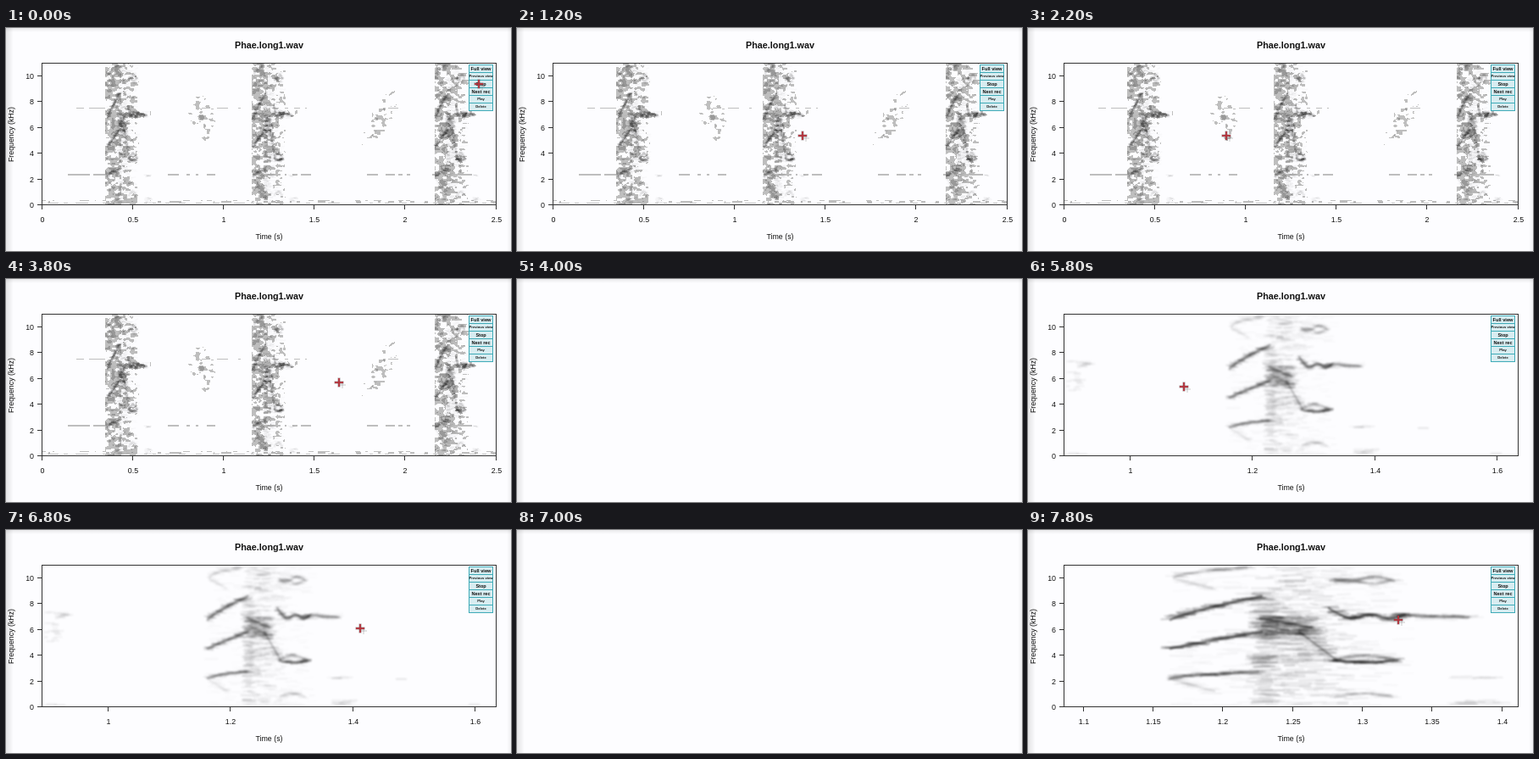
Write an HTML page with a canvas that moves like this. It is 596 px wide and 263 px high and loops after 8 s.

```html
<!DOCTYPE html>
<html lang="en">
<head>
<meta charset="utf-8">
<title>Spectrogram zoom</title>
<style>
html, body { margin: 0; width: 100%; height: 100%; overflow: hidden; background: #fdfdff; }
canvas { display: block; }
</style>
</head>
<body>
<canvas id="stage" width="596" height="263"></canvas>
<script>
const W = 596, H = 263, LOOP = 8000, STEP = 200;
const LEFT = 43, RIGHT = 578, TOP = 42, BOTTOM = 209, KHZ = 15.2;
const FONT = '"Liberation Sans", Arial, sans-serif';
const { sin, cos, exp, sqrt, abs, floor, max, hypot, round, PI } = Math;

// Call shapes are laid out in the closest view; k and dx map them to each view.
const views = [
  { k: .13, dx: 270.1, blur: .45, x0: 43, scale: 214.2, first: 0, gap: .5, count: 6, shifts: [-172, 0, 215] },
  { k: .4384, dx: 164.5, blur: .8, x0: -601, scale: 722, first: 1, gap: .2, count: 4, shifts: [0] },
  { k: 1, dx: 0, blur: 1, x0: -1746.2, scale: 1647, first: 1.1, gap: .05, count: 7, shifts: [0] }
];

const buttons = [['Full view', 5.7], ['Previous view', 4.2], ['Stop', 5.5],
  ['Next rec', 5.6], ['Play', 4.1], ['Delete', 4.2]];

// [step, x, y]
const cursorPath = [[0, 558, 66], [6, 337, 127], [11, 234, 127], [13, 234, 127], [19, 393, 122],
  [23, 393, 122], [24, 366, 128], [28, 168, 127], [29, 184, 127], [30, 184, 127],
  [34, 418, 116], [38, 418, 116], [39, 437, 106]];

let seed = 7;
const random = () => (seed = (seed * 1664525 + 1013904223) % 4294967296) / 4294967296;
const between = (a, b) => a + (b - a) * random();
const lerp = (a, b, u) => a + (b - a) * u;

function newLayer() {
  const canvas = document.createElement('canvas');
  canvas.width = W;
  canvas.height = H;
  return canvas.getContext('2d');
}

function hash(i, j) {
  const s = sin(i * 127.1 + j * 311.7) * 43758.5453;
  return s - floor(s);
}

function noise(x, y) {
  const i = floor(x), j = floor(y);
  const ease = u => u * u * (3 - 2 * u), u = ease(x - i), v = ease(y - j);
  return lerp(lerp(hash(i, j), hash(i + 1, j), u), lerp(hash(i, j + 1), hash(i + 1, j + 1), u), v);
}

function drawCall(g, { k, dx }, shift) {
  const px = x => x * k + dx + shift, fade = sqrt(k);
  g.lineCap = g.lineJoin = 'round';

  function smear(x, y, length, alpha) {
    const half = length * k / 2 + .5, tilt = between(-.8, .8);
    g.strokeStyle = `rgba(0,0,0,${alpha * fade})`;
    g.lineWidth = between(1, 2.2);
    g.beginPath();
    g.moveTo(px(x) - half, y + tilt);
    g.lineTo(px(x) + half, y - tilt);
    g.stroke();
  }

  function haze(x0, x1, y0, y1, count, alpha) {
    for (let i = 0; i < count; i++)
      smear(between(x0, x1), between(y0, y1), between(8, 34), alpha * between(.4, 1.4));
  }

  // A dark streaky line; curve gives its height for u from 0 to 1.
  function ridge(dark, spread, x0, x1, curve) {
    g.beginPath();
    for (let i = 0; i <= 24; i++) g.lineTo(px(lerp(x0, x1, i / 24)), curve(i / 24));
    g.lineWidth = 2.4;
    g.strokeStyle = `rgba(0,0,0,${dark * .65 * fade})`;
    g.stroke();
    for (let n = (x1 - x0) * .5; n > 0; n--) {
      const u = random(), off = (random() + random() - 1) * spread * 2;
      smear(lerp(x0, x1, u), curve(u) + off, between(8, 24), dark * .28);
    }
  }

  haze(272, 338, 43, 208, 260, .1);
  haze(272, 338, 102, 128, 90, .16);
  haze(272, 282, 75, 206, 80, .13);
  haze(335, 380, 43, 208, 90, .07);
  haze(375, 450, 43, 208, 70, .045);
  haze(175, 275, 43, 208, 85, .04);
  haze(280, 355, 120, 155, 60, .08);
  haze(510, 560, 200, 206, 14, .09);
  haze(505, 545, 173, 175, 7, .09);
  haze(440, 530, 98, 107, 14, .07);

  ridge(.75, 2, 168, 276, u => 106 - 28 * u ** .8);
  ridge(.7, 1.5, 168, 276, u => 140 - 20 * u ** .9);
  ridge(.5, 1.5, 168, 272, u => 175 - 8 * u ** .6);
  ridge(.22, 1.5, 172, 258, u => 57 - 13 * sqrt(u));
  ridge(.12, 1.5, 175, 218, u => 58 + 11 * u);
  ridge(.14, 2, 172, 220, u => 177 + 13 * u);
  ridge(.6, 4, 274, 335, u => 104 + 11 * u);
  ridge(.45, 4, 276, 325, u => 112 + 11 * u);
  ridge(.5, 4, 320, 365, u => 120 + 34 * u);
  ridge(.7, 1.3, 360, 436, u => 154 + 2 * sin(PI * u));
  ridge(.8, 1.8, 355, 445, u => 102 - 8 * exp(-12 * u) + 2.5 * cos(4 * PI * (u - .3)));
  ridge(.4, 1.2, 430, 520, u => 100 + 3 * u);
  ridge(.3, 1.3, 362, 432, u => 58 + 3 * sin(7 * u));
  ridge(.22, 1.5, 362, 428, u => 61 - 3 * sin(7 * u));
  ridge(.3, 1.5, 362, 432, u => 153 - 5 * sin(PI * u));
  ridge(.18, 1.5, 362, 430, u => 197 - 4 * sin(PI * u));
}

// Likelihood of a grey patch in the full view.
function patchLevel(x, y) {
  let p = 0;
  for (const start of [119, 292, 508]) {
    const d = x - start;
    if (d > -3 && d < 17) p = max(p, .66 - abs(d - 7) * .012);
    else if (d >= 17 && d < 38) p = max(p, .44 - max(0, d - 30) * .03);
    if (d >= 17 && d < 52) p = max(p, .62 - abs(y - 101) * .05 - max(0, d - 32) * .01);
  }
  for (const cx of [231, 440]) {
    const slant = cx > 400 ? (y - 110) * -.25 : (y - 105) * .12;
    p = max(p, .6 - hypot((x - cx - slant) / 12, (y - 105) / 27) * .32);
  }
  return p;
}

function drawPatches(g) {
  const inside = (x, ...spans) => spans.some(([a, b]) => x > a && x < b);
  for (let y = TOP; y < BOTTOM; y++)
    for (let x = LEFT; x < RIGHT; x++) {
      const n = noise(x / 4.5, y / 2.8) * .75 + noise(x / 2, y / 1.7 + 50) * .25;
      const streak = noise(x / 5, floor(y / 2) * 3.7);
      const p = patchLevel(x, y);
      const hum = y > 171 && y < 174 && streak < .62
        && inside(x, [72, 119], [190, 247], [290, 360], [425, 478], [500, 550]);
      const ground = y > 202 && y < 207 && streak < .36;
      const trace = y === 94 && streak < .4 && inside(x, [62, 118], [225, 355], [450, 500]);
      if (n < p || hum || ground || trace) {
        g.fillStyle = n < p - .27 ? '#999' : '#bebebe';
        g.fillRect(x, y, 1, 1);
      }
    }
}

function drawEchoes(g) {
  for (let i = 0; i < 34; i++) {
    const high = i % 2;
    g.fillStyle = `rgba(0,0,0,${between(.03, .1)})`;
    g.fillRect(between(45, high ? 70 : 58), high ? between(96, 104) : between(108, 131), between(4, 12), 1.5);
  }
  g.fillStyle = 'rgba(0,0,0,.12)';
  for (const [x, y] of [[47, 205], [57, 206], [384, 174], [385, 203], [388, 206], [460, 175], [546, 205]])
    g.fillRect(x, y, 13, 1.5);
}

function drawBackground(g) {
  g.fillStyle = '#fdfdff';
  g.fillRect(0, 0, W, H);
  const shadeEdge = (x, dx, dy, alpha) => {
    const shade = g.createLinearGradient(x, 0, x + dx, dy);
    shade.addColorStop(0, `rgba(0,0,0,${alpha})`);
    shade.addColorStop(1, 'rgba(0,0,0,0)');
    g.fillStyle = shade;
    g.fillRect(0, 0, W, H);
  };
  shadeEdge(0, 9, 0, .1);
  shadeEdge(0, 0, 5, .08);
  shadeEdge(W, -5, 0, .06);
}

function label(g, text, x, y, size, align = 'center', weight = '') {
  g.font = `${weight} ${size}px ${FONT}`;
  g.textAlign = align;
  g.fillStyle = '#111';
  g.fillText(text, x, y);
}

function drawFrame(g, view) {
  g.strokeStyle = '#333';
  g.lineWidth = 1;
  g.strokeRect(LEFT - .5, TOP - .5, RIGHT - LEFT + 1, BOTTOM - TOP);
  const line = (x0, y0, x1, y1) => {
    g.beginPath();
    g.moveTo(x0, y0);
    g.lineTo(x1, y1);
    g.stroke();
  };
  for (let i = 0; i < view.count; i++) {
    const t = view.first + i * view.gap, x = round(view.x0 + t * view.scale);
    line(x - .5, BOTTOM, x - .5, BOTTOM + 5);
    label(g, String(+t.toFixed(2)), x, 229, 8.9);
  }
  for (let f = 0; f <= 10; f += 2) {
    const y = round(BOTTOM - f * KHZ) - .5;
    line(LEFT - 6, y, LEFT, y);
    label(g, String(f), 33, y + 3.7, 8.9, 'right');
  }
  label(g, 'Phae.long1.wav', 310.5, 24, 10.8, 'center', 'bold');
  label(g, 'Time (s)', 310.5, 249, 8.8);
  g.save();
  g.translate(9, 125.5);
  g.rotate(-PI / 2);
  label(g, 'Frequency (kHz)', 0, 0, 8.8);
  g.restore();

  buttons.forEach(([text, size], i) => {
    const y = 43 + i * 9;
    g.fillStyle = '#d8edf1';
    g.fillRect(546, y, 29, 9);
    g.strokeStyle = '#3fabb8';
    g.strokeRect(546.5, y + .5, 28, 9);
    label(g, text, 560.5, y + 4.7 + size * .36, size, 'center', 'bold');
  });
}

function renderView(view, index) {
  const g = newLayer(), sound = newLayer();
  drawBackground(g);
  if (index === 0) drawPatches(sound);
  if (index === 1) drawEchoes(sound);
  for (const shift of view.shifts) drawCall(sound, view, shift);
  g.save();
  g.beginPath();
  g.rect(LEFT, TOP, RIGHT - LEFT, BOTTOM - TOP);
  g.clip();
  g.filter = `blur(${view.blur}px)`;
  g.drawImage(sound.canvas, 0, 0);
  g.restore();
  drawFrame(g, view);
  return g.canvas;
}

function plus(g, x, y, arm, width, color) {
  g.fillStyle = color;
  g.fillRect(x - arm, y - width / 2, arm * 2, width);
  g.fillRect(x - width / 2, y - arm, width, arm * 2);
}

function drawCursor(g, step) {
  const next = cursorPath.findIndex(key => key[0] >= step);
  const b = cursorPath[next], a = cursorPath[max(0, next - 1)];
  const u = b === a ? 1 : (step - a[0]) / (b[0] - a[0]);
  const x = round(lerp(a[1], b[1], u)), y = round(lerp(a[2], b[2], u));
  plus(g, x + 4, y + 3, 4, 2, 'rgba(120,120,120,.2)');
  plus(g, x, y, 5.5, 3, 'rgba(70,40,45,.45)');
  plus(g, x, y, 5, 1.8, '#b5333c');
}

const stage = document.getElementById('stage').getContext('2d');
const pictures = views.map(renderView);
const blank = newLayer();
drawBackground(blank);

function draw() {
  const step = floor(performance.now() % LOOP / STEP);
  if (step === 20 || step === 35) {
    stage.drawImage(blank.canvas, 0, 0);
  } else {
    stage.drawImage(pictures[step < 20 ? 0 : step < 35 ? 1 : 2], 0, 0);
    drawCursor(stage, step);
  }
  requestAnimationFrame(draw);
}
draw();
</script>
</body>
</html>
```
